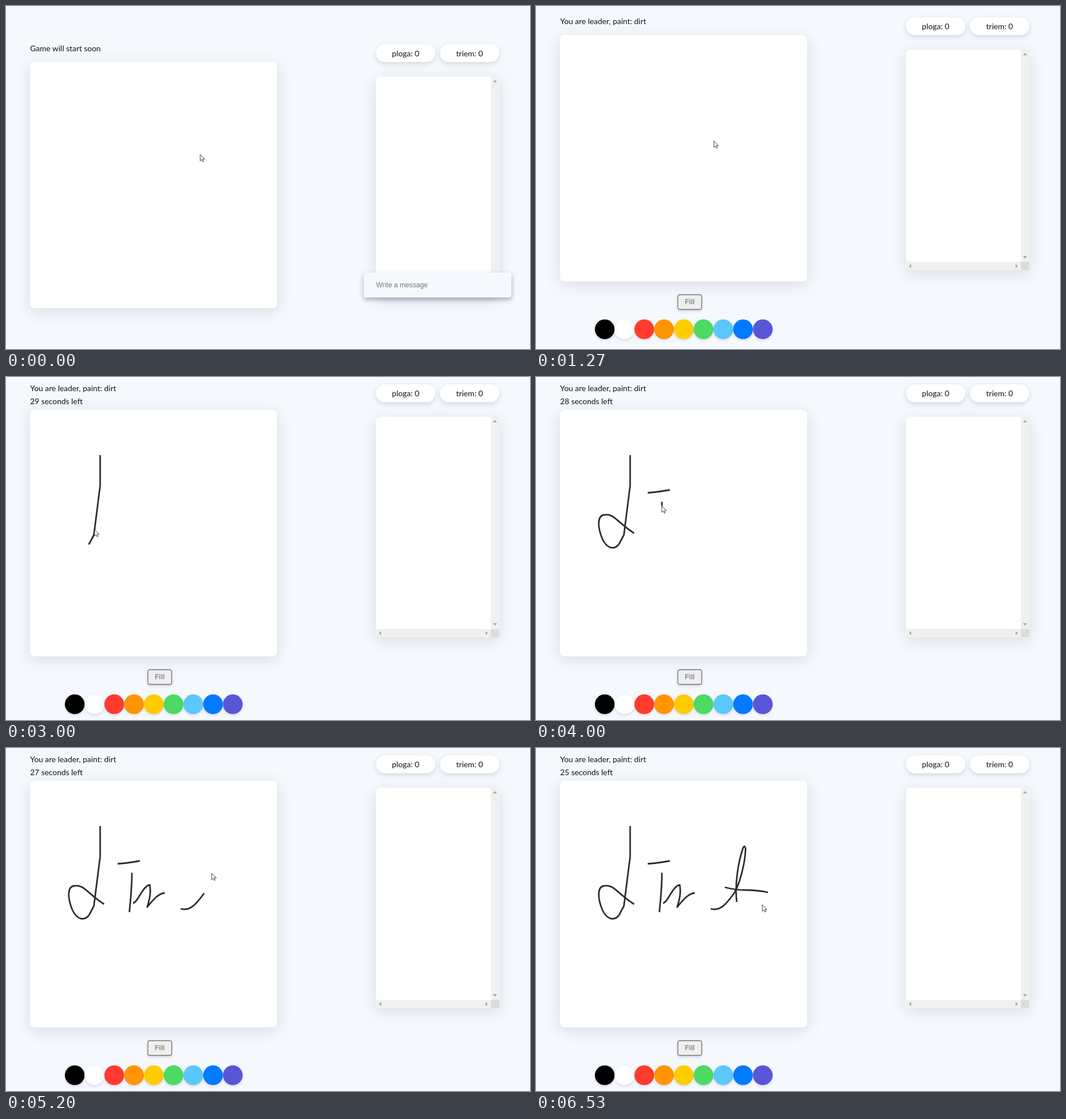
These frames come from a looping animation (924x606 px, 6730 ms). An HTML page:

```html
<!DOCTYPE html>
<html lang="en">
<head>
<meta charset="utf-8">
<title>Drawing game</title>
<style>
  html, body { margin: 0; width: 100%; height: 100%; overflow: hidden; background: #f5f8fd; }
  svg { display: block; }
  text { font: 13.92px Lato, sans-serif; fill: #111; }
  .mid { text-anchor: middle; }
  .ui { font: 12.18px "Liberation Sans", Arial, sans-serif; fill: #757575; }
  .fill { font-weight: bold; fill: #8c8c8c; }
  .card { fill: #fff; filter: drop-shadow(0 6px 13px rgba(50, 55, 85, .14)); }
  .pill { fill: #fff; filter: drop-shadow(0 3px 4px rgba(50, 55, 85, .17)); }
  .dot { filter: drop-shadow(0 2px 2px rgba(50, 55, 85, .16)); }
  .button { fill: #efefef; stroke: #868686; stroke-width: 1.6; filter: drop-shadow(0 2px 2px rgba(50, 55, 85, .2)); }
  .input { fill: #f5f8fd; filter: drop-shadow(0 4px 4px rgba(40, 45, 75, .36)); }
  .bar { fill: #f0f0f0; }
  .arrow { fill: #a0a0a0; }
  #ink { fill: none; stroke-width: 2.8; stroke-linejoin: round; }
  .pen { stroke: #2c2c2c; }
</style>
</head>
<body>
<svg width="924" height="606" viewBox="0 0 924 606">
  <g id="board">
    <rect class="card" x="42.5" y="98.5" width="435.5" height="435.5" rx="8"/>
    <g id="tools">
      <rect class="button" x="250.2" y="557.6" width="42" height="26" rx="3.5"/>
      <text class="ui fill mid" x="271.2" y="574.3">Fill</text>
    </g>
  </g>
  <text id="title" x="42.5"></text>
  <text id="clock" x="42.5" y="48"></text>
  <g id="side">
    <rect class="pill" x="652.5" y="67.5" width="104.5" height="31.5" rx="15.75"/>
    <rect class="pill" x="765.3" y="67.5" width="104.5" height="31.5" rx="15.75"/>
    <text class="mid" x="704.7" y="88.5">ploga: 0</text>
    <text class="mid" x="817.5" y="88.5">triem: 0</text>
    <rect class="card" x="652.5" y="124.8" width="217.2" height="389.2" rx="7"/>
    <path class="bar" d="M855 124.8h10q4.7 0 4.7 4.7V499.4H855zM652.5 499.4H855V514H652.5z"/>
    <rect x="855" y="499.4" width="14.7" height="14.6" fill="#dcdcdc"/>
    <path class="arrow" d="M858.8 134.6h7l-3.5-3.8zM858.8 489.6h7l-3.5 3.8zM661.5 503.4v7l-3.8-3.5zM845.8 503.4v7l3.8-3.5z"/>
  </g>
  <g id="chat">
    <rect class="input" x="630.8" y="471" width="260.4" height="44" rx="4"/>
    <text class="ui" x="652.5" y="496.5">Write a message</text>
  </g>
  <g id="ink"></g>
  <path id="cursor" d="M0 0V11.4L2.6 9L4.4 12.8L6.2 12L4.5 8.3H8.1Z" fill="#fff" stroke="#2a2a2a" stroke-width=".9"/>
</svg>
<script>
const LOOP = 6730, STEP = 1000 / 15;
const START = 1260, TICK = 2260;
const $ = id => document.getElementById(id);

const colors = ['#000', '#fff', '#ff3b30', '#ff9500', '#ffcc00', '#4cd964', '#5ac8fa', '#007aff', '#5856d6'];
$('tools').insertAdjacentHTML('beforeend', colors.map((c, i) =>
  `<circle class="dot" cx="${121.2 + 34.84 * i}" cy="618.7" r="17.4" fill="${c}"/>`).join(''));

// One pointer move from start to end; lead is how far the pointer runs ahead of the ink
function move(kind, start, end, d, lead = 0) {
  const path = document.createElementNS('http://www.w3.org/2000/svg', 'path');
  path.setAttribute('d', d);
  path.setAttribute('class', kind);
  $('ink').append(path);
  return { path, start, end, lead, length: path.getTotalLength() };
}
const hover = (...args) => move('hover', ...args);
const pen = (...args) => move('pen', ...args);

const moves = [
  hover(467, 600, 'M342.4 262.2L326 250'),
  hover(933, 1133, 'M326 250L313.8 238.4'),
  hover(1533, 2000, 'M313.8 238.4L219.5 194.5'),
  hover(2133, 2667, 'M219.5 194.5Q216 170 166 139'),
  pen(2870, 3001, 'M166 138V192L155 279L146 296', -28),
  pen(3001, 3333, 'M146 296C137 306 125 303 117 286C108 264 108 244 121 243.5C136 240 145 258 173 276'),
  pen(3600, 3800, 'M197 204.5Q210 204 236 199.5'),
  pen(3985, 4133, 'M222 220.5Q222 248 217.5 290'),
  pen(4333, 4800, 'M224 274C232 274 241 243 253.5 242C256 256 253 268 249 281C258 270 268 257 280 256'),
  pen(5087, 5600, 'M308 284C325 289 336 275 349 257C358 243 369 205 369.5 178Q368 170 365 177C357 200 350 240 354 272', 38),
  pen(5800, 6067, 'M333 246Q350 251 370 251T409 255'),
  hover(6267, 6267, 'M392.5 280.5h.1'),
  hover(6467, 6533, 'M392.5 280.5L399.2 277')
];

const clamp = (v, max) => Math.min(max, Math.max(0, v));
const progress = (t, a, b) => b > a ? clamp((t - a) / (b - a), 1) : +(t >= b);
const pointAt = (m, k) => m.path.getPointAtLength(clamp(k * m.length + m.lead, m.length));

function pointerAt(t) {
  const i = moves.findIndex(m => t < m.end);
  if (i < 0) return pointAt(moves[moves.length - 1], 1);
  const next = moves[i], last = moves[i - 1];
  if (t >= next.start || !last) return pointAt(next, progress(t, next.start, next.end));
  // Glide from the last move to the next one
  const a = last.path.getPointAtLength(last.length), b = next.path.getPointAtLength(0);
  const k = progress(t, last.end, next.start);
  return { x: a.x + (b.x - a.x) * k, y: a.y + (b.y - a.y) * k };
}

const shift = (id, x, y) => $(id).setAttribute('transform', `translate(${x} ${y})`);
const show = (id, on) => $(id).style.display = on ? '' : 'none';

function draw(time) {
  const t = Math.floor((time % LOOP + 5) / STEP) * STEP + .5;
  const phase = (t > START) + (t > TICK);
  shift('board', 0, [0, -47.5, -40.5][phase]);
  shift('side', 0, [0, -47.5, -54.5][phase]);
  $('title').setAttribute('y', [80, 32, 25][phase]);
  $('title').textContent = phase ? 'You are leader, paint: dirt' : 'Game will start soon';
  $('clock').textContent = phase > 1 ? `${29 - Math.floor((t - TICK) / 1000)} seconds left` : '';
  show('tools', phase);
  show('chat', !phase);
  for (const m of moves) {
    m.path.setAttribute('stroke-dasharray', `${progress(t, m.start, m.end) * (m.length + 1)} 9999`);
  }
  const { x, y } = pointerAt(t);
  shift('cursor', x, y);
}

const t0 = performance.now();
function loop() {
  draw(performance.now() - t0);
  requestAnimationFrame(loop);
}
loop();
</script>
</body>
</html>
```
